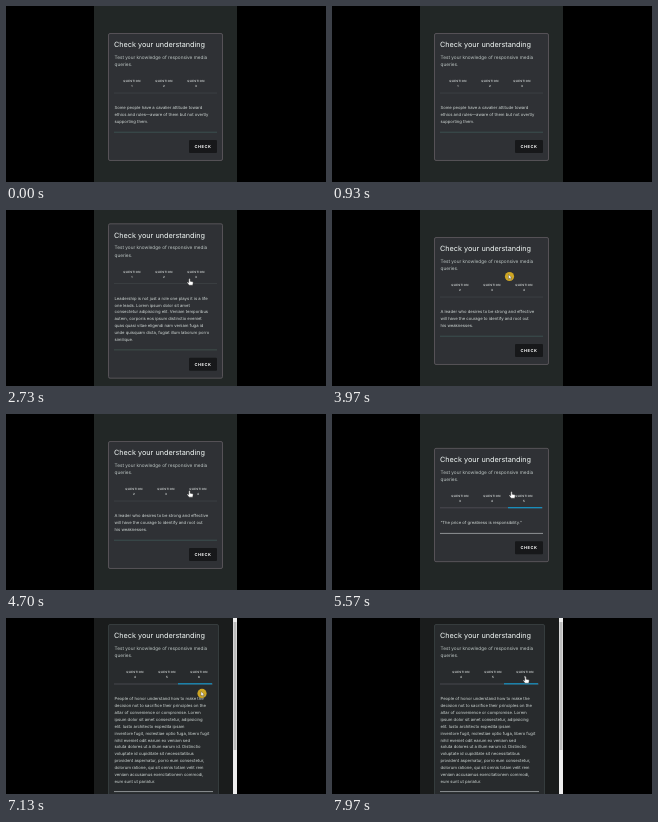
These frames come from a looping animation (320x176 px, 8 s). An HTML page:

```html
<!DOCTYPE html>
<html lang="en">
<head>
<meta charset="utf-8">
<title>Quiz card</title>
<style>
  html, body { margin: 0; width: 100%; height: 100%; overflow: hidden; background: #000; }
  svg { display: block; width: 320px; height: 176px; font-family: Inter, "Open Sans", sans-serif; text-rendering: geometricPrecision; }
  .title { font-size: 7.27px; fill: #f4faf8; }
  .desc { font-size: 4.72px; fill: #bcc5c3; }
  .body { font-size: 4.2px; fill: #d3dbd8; }
  .tab { font-size: 2.9px; font-weight: 500; letter-spacing: .3px; fill: #eef3f1; text-anchor: middle; }
  .check { font-size: 4px; font-weight: 700; letter-spacing: .55px; fill: #fff; text-anchor: middle; }
</style>
</head>
<body>
<svg id="stage" viewBox="0 0 320 176"></svg>
<script>
const LOOP = 8000;
const LINE = 6.85;

const panels = [
  { at: 0, scroll: 0, rule: '#3d5655', text: `Some people have a cavalier attitude toward
ethics and rules—aware of them but not overtly
supporting them.` },
  { at: 2250, scroll: 0, rule: '#42544f', text: `Leadership is not just a role one plays it is a life
one leads. Lorem ipsum dolor sit amet
consectetur adipisicing elit. Veniam temporibus
autem, corporis eos ipsum distinctio eveniet
quas quasi vitae eligendi nam veniam fuga id
unde quisquam dicta, fugiat illum laborum porro
similique.` },
  { at: 3620, scroll: 30, rule: '#3d5655', text: `A leader who desires to be strong and effective
will have the courage to identify and root out
his weaknesses.` },
  { at: 5190, scroll: 62, rule: '#a4a8aa', hot: true, text: `“The price of greatness is responsibility.”` },
  { at: 6750, scroll: 93, rule: '#a4a8aa', hot: true, tall: true, text: `People of honor understand how to make the
decision not to sacrifice their principles on the
altar of convenience or compromise. Lorem
ipsum dolor sit amet consectetur, adipisicing
elit. Iusto architecto expedita ipsam
inventore fugit, molestiae optio fuga, libero fugit
nihil eveniet odit earum ex veniam sed
soluta dolores ut a illum earum id. Distinctio
voluptate id cupiditate sit necessitatibus
provident aspernatur, porro eum consectetur,
dolorum ratione, qui sit omnis totam velit rem
veniam accusamus exercitationem commodi,
eum sunt ut pariatur.` }
];

// time, x, y
const path = [
  [1230, 105, 182], [1730, 139, 91.5], [2070, 186, 80], [2250, 187, 80],
  [2730, 184, 72], [3030, 186, 69], [3600, 186, 69], [3970, 177.5, 66.5],
  [4730, 184, 80], [5170, 184, 80], [5570, 180, 81], [6230, 198, 88.5],
  [6700, 198, 88.5], [7570, 194, 62], [8000, 194, 62]
];

const stage = document.getElementById('stage');

function add(parent, tag, attrs, text) {
  const el = document.createElementNS('http://www.w3.org/2000/svg', tag);
  for (const key in attrs) el.setAttribute(key, attrs[key]);
  if (text) el.textContent = text;
  parent.append(el);
  return el;
}

const rect = (parent, x, y, width, height, fill, more) =>
  add(parent, 'rect', { x, y, width, height, fill, ...more });
const label = (parent, cls, x, y, text) => add(parent, 'text', { class: cls, x, y }, text);
const show = (el, on) => el.setAttribute('visibility', on ? 'visible' : 'hidden');
const move = (el, x, y) => el.setAttribute('transform', `translate(${x} ${y})`);
const ease = p => p * p * (3 - 2 * p);
const clamp = v => Math.min(1, Math.max(0, v));

const defs = add(stage, 'defs');
const clip = add(defs, 'clipPath', { id: 'row' });
const clipBox = rect(clip, 108, 40, 103, 24, '#fff');

// Each panel is laid out from the card's top edge.
function buildPanel(panel) {
  const lines = panel.text.split('\n');
  const height = 107.4 + LINE * lines.length;
  const width = panel.tall ? 111 : 115;
  const right = 102 + width - 6;
  panel.top = Math.max(6, 91 - height / 2);
  panel.right = right;

  const g = panel.el = add(stage, 'g');
  rect(g, 88, 0, 143, 176, panel.tall ? '#1a1c1c' : '#222726');
  const card = add(g, 'g');
  move(card, 0, panel.top);
  rect(card, 102.5, .5, width - 1, height - 1, panel.tall ? '#282b2d' : '#2f3135',
    { rx: 1.5, stroke: panel.tall ? '#3c4345' : '#625d63', 'stroke-width': .8 });
  label(card, 'title', 108, 14.2, 'Check your understanding');
  label(card, 'desc', 108.5, 25.8, 'Test your knowledge of responsive media');
  label(card, 'desc', 108.5, 33.4, 'queries.');

  rect(card, 108, 59.7, right - 108, .6, panel.hot ? '#5b5963' : '#42474a');
  if (panel.hot) rect(card, right - 35, 59.2, 34, 1.2, '#1593c4');

  const row = add(card, 'g', { 'clip-path': 'url(#row)' });
  panel.tabs = add(row, 'g');
  for (let i = 0; i < 6; i++) {
    label(panel.tabs, 'tab', 126 + 32 * i, 49.2, 'QUESTION');
    label(panel.tabs, 'tab', 126 + 32 * i, 54.2, String(i + 1));
  }

  lines.forEach((line, i) => label(card, 'body', 108.5, 76.4 + LINE * i, line));

  const rule = 78.6 + LINE * lines.length;
  rect(card, 108, rule - .4, right - 108, .8, panel.rule);
  rect(card, right - 28, rule + 7.8, 28, 13, '#17181a', { rx: 1 });
  label(card, 'check', right - 14, rule + 15.8, 'CHECK');

  if (panel.tall) {
    rect(g, 227, 0, 4, 176, '#eeeeee');
    rect(g, 227.5, 4, 3, 128, '#bdbdbd');
  }
}

panels.forEach(buildPanel);

const cursor = add(stage, 'g');
const halo = add(cursor, 'g');
add(halo, 'circle', { r: 4.6, fill: '#cda523' });
add(halo, 'path', { d: 'M-1-2v4.6l1.1-1 .8 1.7.8-.4-.8-1.6h1.5z', fill: '#fff', stroke: '#333', 'stroke-width': .35 });
const hand = add(cursor, 'path', {
  d: 'M-1.2-3q.7-.8 1.4 0v2.2l2.4.6q.7.2.6 1l-.5 2.4h-3.6l-2-2.6q0-1 1.7 0z',
  fill: '#fff', stroke: '#222', 'stroke-width': .4
});

function cursorAt(t) {
  const i = path.findIndex(k => k[0] > t);
  if (i < 1) return null;
  const [a, b] = [path[i - 1], path[i]];
  const p = ease((t - a[0]) / (b[0] - a[0]));
  return [a[1] + (b[1] - a[1]) * p, a[2] + (b[2] - a[2]) * p];
}

function draw(t) {
  const n = panels.findLastIndex(p => p.at <= t);
  const panel = panels[n];
  panels.forEach((p, i) => show(p.el, i === n));

  const from = n ? panels[n - 1].scroll : 0;
  const p = ease(clamp((t - panel.at) / 300));
  move(panel.tabs, -(from + (panel.scroll - from) * p), 0);
  clipBox.setAttribute('width', panel.right - 108);

  const pos = cursorAt(t);
  show(cursor, pos);
  if (!pos) {
    show(halo, false);
    show(hand, false);
    return;
  }
  move(cursor, ...pos);
  const y = pos[1] - panel.top;
  const overTab = pos[0] > 108 && pos[0] < panel.right && y > 42.5 && y < 61;
  show(hand, overTab);
  show(halo, !overTab);
}

const start = performance.now();
function tick() {
  draw((performance.now() - start) % LOOP);
  requestAnimationFrame(tick);
}
tick();
</script>
</body>
</html>
```
